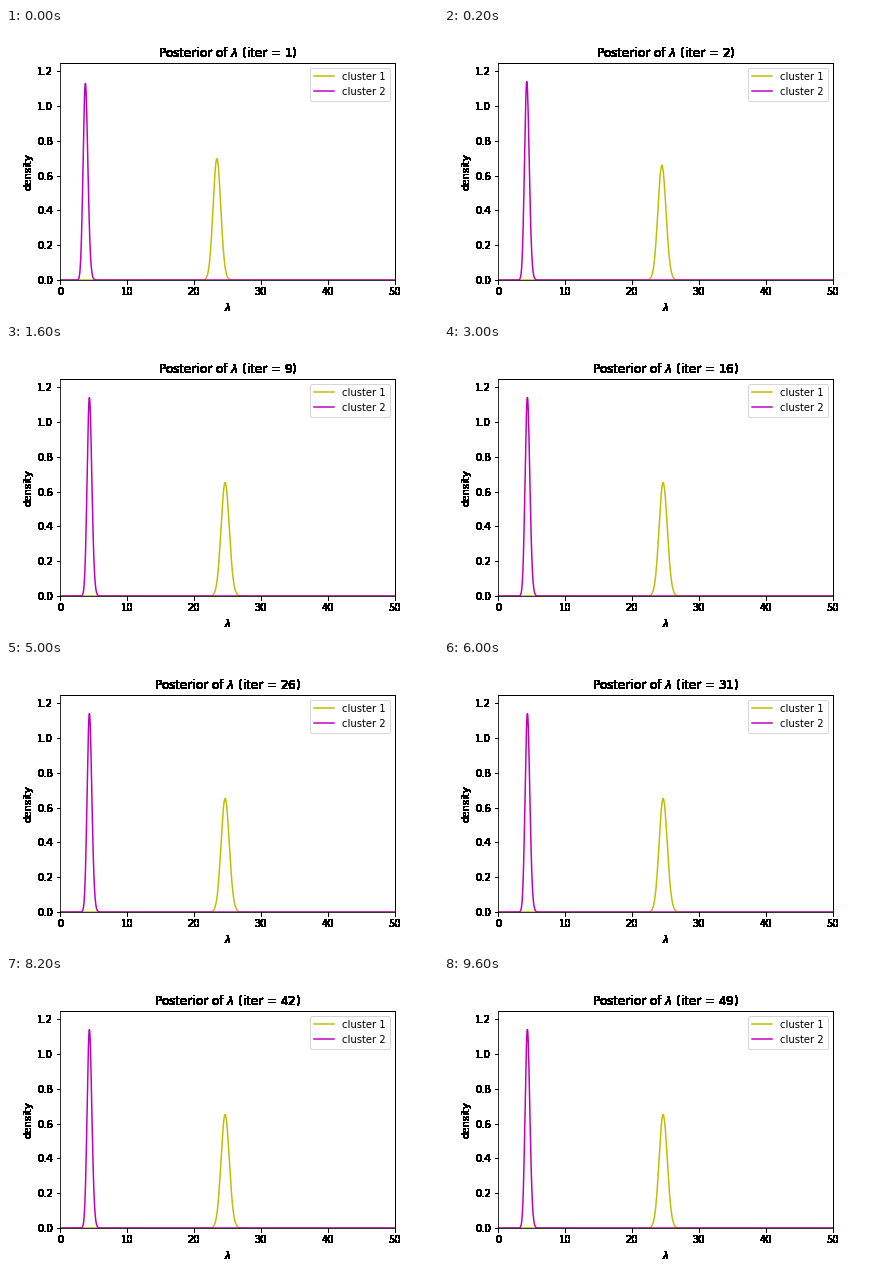
A matplotlib script for the animation above (9.8 s loop, 432 px wide and 288 px high).

```python
import math

import matplotlib.pyplot as plt
import numpy as np
from matplotlib.animation import FuncAnimation

FRAMES = 49
INTERVAL = 200
RATE = 0.15  # share of the remaining gap left after each iteration

# color, (mode, rate) at the start, (mode, rate) once converged
CLUSTERS = [
    ("y", (23.43, 71.7), (24.66, 66.0)),
    ("m", (3.79, 30.5), (4.39, 36.0)),
]

x = np.linspace(1e-9, 50, 1000)


def gamma_pdf(mode, rate):
    shape = mode * rate + 1
    log_norm = shape * math.log(rate) - math.lgamma(shape)
    return np.exp(log_norm + (shape - 1) * np.log(x) - rate * x)


def solid(image, dpi):
    """Turn every touched pixel opaque black, without antialiasing."""
    out = np.zeros_like(image)
    out[..., 3] = image[..., 3] > 0
    return out, 0, 0


plt.rcParams.update({"font.family": "DejaVu Sans", "font.size": 10})
fig, ax = plt.subplots(figsize=(6, 4), dpi=72, facecolor="white")
fig.subplots_adjust(left=0.125, right=0.9, bottom=0.125, top=0.88)

lines = [
    ax.plot(x, gamma_pdf(*start), color=color, label=f"cluster {i}")[0]
    for i, (color, start, _) in enumerate(CLUSTERS, 1)
]
ax.set_xlim(0, 50)
ax.set_ylim(0, 1.25)
ax.set_xticks(range(0, 51, 10))
ax.set_yticks(np.arange(7) * 0.2)
ax.set_xlabel(r"$\lambda$")
ax.set_ylabel("density")
ax.legend(loc="upper right")
title = ax.set_title("")

crisp = [title, ax.xaxis.label, ax.yaxis.label, ax.spines["top"], ax.spines["right"]]
for axis in (ax.xaxis, ax.yaxis):
    for tick in axis.get_major_ticks():
        crisp += [tick.label1, tick.tick1line]
for artist in crisp:
    artist.set_agg_filter(solid)


def update(frame):
    progress = 1 - RATE ** frame
    for line, (_, start, end) in zip(lines, CLUSTERS):
        mode, rate = (a + (b - a) * progress for a, b in zip(start, end))
        line.set_ydata(gamma_pdf(mode, rate))
    title.set_text(rf"Posterior of $\lambda$ (iter = {frame + 1})")
    return [*lines, title]


anim = FuncAnimation(fig, update, frames=FRAMES, interval=INTERVAL,
                     repeat=True, repeat_delay=0, blit=False)
plt.show()
```
